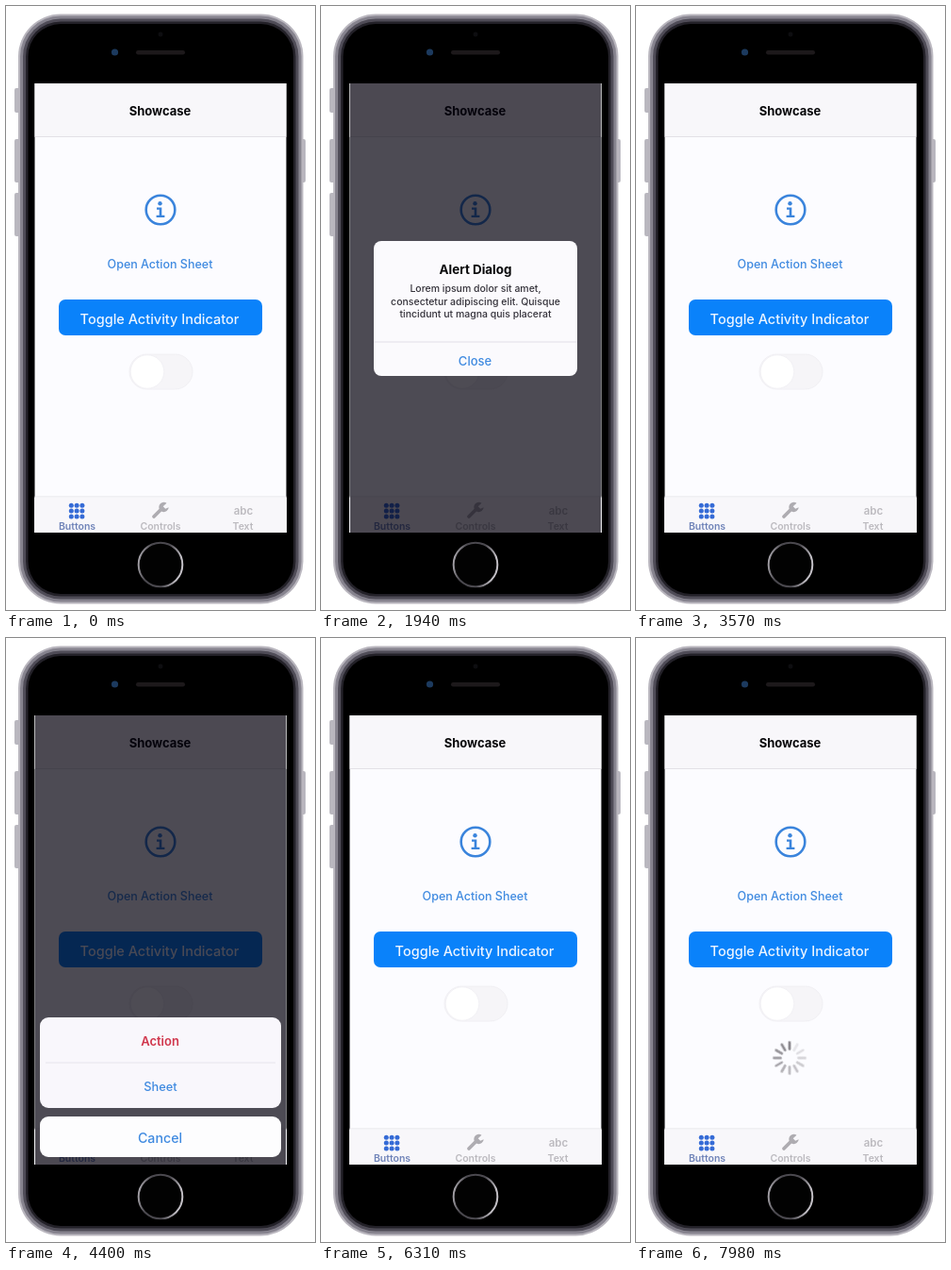
These frames come from a looping animation (328 px wide and 640 px high, 8 s). An HTML page:

```html
<!DOCTYPE html>
<html lang="en">
<head>
<meta charset="utf-8">
<title>Showcase</title>
<style>
  html, body { margin: 0; width: 100%; height: 100%; overflow: hidden; background: #fff; }
  svg { display: block; width: 100%; height: 100%; }
  text { font: 500 12.5px Inter, Roboto, sans-serif; text-anchor: middle; }
  .title { font-size: 13px; font-weight: 700; fill: #08080a; }
  .body { font-size: 10.5px; fill: #34323a; }
  .tab { font-size: 10.5px; font-weight: 600; }
  .bar { fill: #f8f7fa; }
  .idle { fill: #bcbabf; }
  .link { fill: #3f8ae0; }
  .tint { fill: #e5e3ea; }
  #alert, #sheet, #dim, #spinner, #closeTint, #cancelTint { opacity: 0; }
  #alert { transform-origin: 164px 320px; }
  #wheel { transform-origin: 163px 445px; }
</style>
</head>
<body>
<svg viewBox="0 0 328 640">
  <defs>
    <clipPath id="screen"><rect x="30.5" y="82" width="267" height="476"/></clipPath>
    <clipPath id="dialog"><rect x="56" y="249" width="216" height="143" rx="8"/></clipPath>
    <linearGradient id="ring" x2="1" y2="0.2">
      <stop offset="0" stop-color="#c3c0c6"/>
      <stop offset="0.3" stop-color="#4a484e"/>
      <stop offset="0.7" stop-color="#4a484e"/>
      <stop offset="1" stop-color="#c3c0c6"/>
    </linearGradient>
  </defs>

  <!-- Handset -->
  <g fill="#b9b7bf">
    <rect x="9" y="87" width="6" height="26" rx="2"/>
    <rect x="9" y="141" width="6" height="46" rx="2"/>
    <rect x="9" y="198" width="6" height="46" rx="2"/>
    <rect x="313" y="141" width="5" height="46" rx="2"/>
  </g>
  <g id="shell"></g>
  <circle cx="115.5" cy="49" r="3.6" fill="#1c3a5e"/>
  <circle cx="164" cy="30" r="2.5" fill="#0d0d10"/>
  <rect x="138" y="47" width="52" height="4.5" rx="2.2" fill="#1d191b"/>
  <circle cx="164" cy="592" r="23.3" fill="#020202" stroke="url(#ring)" stroke-width="2"/>

  <g clip-path="url(#screen)">
    <rect x="30" y="82" width="268" height="476" fill="#fcfcff"/>
    <rect class="bar" x="30" y="82" width="268" height="56"/>
    <path d="M30 138.5H298M30 520H298" stroke="#e3e1e6"/>
    <text class="title" x="163.5" y="116">Showcase</text>

    <g id="info" color="#3a84dc" fill="currentColor">
      <circle cx="164" cy="216" r="15.3" fill="none" stroke="currentColor" stroke-width="2.6"/>
      <circle cx="163.5" cy="209.3" r="2.2"/>
      <path d="M160 213.5H165.3V221.7H168.4V224H159.6V221.7H162.7V215.8H160Z"/>
    </g>

    <text id="openLink" class="link" x="163.5" y="278">Open Action Sheet</text>

    <rect id="button" x="56" y="311" width="216" height="38" rx="7" fill="#0a82fa"/>
    <text x="163" y="336.5" style="font-size:14.5px" fill="#edf5ff">Toggle Activity Indicator</text>

    <rect x="131" y="369" width="67" height="37" rx="18.5" fill="#f6f5f8" stroke="#f1f0f4"/>
    <circle cx="150" cy="387.5" r="17.8" fill="#fff" stroke="#f2f1f5"/>

    <g id="spinner"><g id="wheel" stroke="#87848a" stroke-width="2.7" stroke-linecap="round"></g></g>

    <rect class="bar" x="30" y="520.5" width="268" height="38"/>
    <g id="grid" fill="#356bd6"></g>
    <text class="tab" x="75.5" y="555" fill="#6f83b8">Buttons</text>
    <g fill="#aeacb1">
      <path d="M157 541L165.5 532.5" stroke="#aeacb1" stroke-width="3.8" stroke-linecap="round"/>
      <path d="M170.5 526.7A5.2 5.2 0 1 0 172.7 531.2L169.2 532.8L166.7 530.3Z"/>
    </g>
    <text class="tab idle" x="164" y="555">Controls</text>
    <text class="idle" x="252" y="539" style="font-size:11.5px;font-weight:600">abc</text>
    <text class="tab idle" x="251.5" y="555">Text</text>

    <rect id="dim" x="30" y="82" width="268" height="476" fill="#04000c"/>

    <g id="alert">
      <g clip-path="url(#dialog)">
        <rect x="56" y="249" width="216" height="143" fill="#fbfafd"/>
        <rect x="56" y="355.5" width="216" height="1" fill="#e2e0e7"/>
        <rect id="closeTint" class="tint" x="56" y="356" width="216" height="36"/>
      </g>
      <text class="title" x="164" y="283.5" style="font-size:13.4px">Alert Dialog</text>
      <text class="body" x="164" y="303">Lorem ipsum dolor sit amet,</text>
      <text class="body" x="164" y="316.5">consectetur adipiscing elit. Quisque</text>
      <text class="body" x="164" y="330">tincidunt ut magna quis placerat</text>
      <text class="link" x="163.5" y="381" style="font-size:13px">Close</text>
    </g>

    <g id="sheet">
      <rect x="36" y="402" width="256" height="96" rx="9" fill="#f9f7fc"/>
      <path d="M42 450H286" stroke="#e6e4ec"/>
      <text x="163.5" y="431.5" style="font-weight:600;font-size:13px" fill="#d0364c">Action</text>
      <text class="link" x="164" y="480" style="font-size:12.8px">Sheet</text>
      <rect x="36" y="507" width="256" height="43" rx="9" fill="#fdfdfe"/>
      <rect id="cancelTint" class="tint" x="36" y="507" width="256" height="43" rx="9"/>
      <text class="link" x="163.5" y="535" style="font-size:14.2px">Cancel</text>
    </g>
  </g>
</svg>

<script>
const LOOP = 8000;
const get = id => document.getElementById(id);

function add(parent, tag, attrs) {
  const node = document.createElementNS("http://www.w3.org/2000/svg", tag);
  for (const [name, value] of Object.entries(attrs)) node.setAttribute(name, value);
  get(parent).append(node);
}

[[0, "#b9b6be"], [2, "#86838e"], [5, "#4f4c57"], [8, "#232128"], [10.5, "#000"]].forEach(([inset, fill]) =>
  add("shell", "rect", {
    x: 13 + inset, y: 8.5 + inset, width: 302.5 - 2 * inset, height: 625 - 2 * inset,
    rx: 45 - inset, fill
  }));

for (let i = 0; i < 9; i++) {
  add("grid", "circle", { cx: 69.3 + i % 3 * 5.8, cy: 529.3 + Math.floor(i / 3) * 5.8, r: 2.5 });
}

for (let i = 0; i < 12; i++) {
  add("wheel", "path", {
    d: "M163 435.5V428.5",
    transform: `rotate(${30 - i * 30} 163 445)`,
    opacity: 1 - i * 0.075
  });
}

// Each step is [time in ms, value, easing towards the next step].
function play(id, property, steps) {
  const at = (time, value, easing = "linear") => ({ offset: time / LOOP, [property]: value, easing });
  const frames = steps.map(step => at(...step));
  if (steps[0][0] > 0) frames.unshift(at(0, steps[0][1]));
  frames.push(at(LOOP, steps.at(-1)[1]));
  get(id).animate(frames, { duration: LOOP, iterations: Infinity });
}

const pulse = (id, property, rest, pressed, from, to) =>
  play(id, property, [[0, rest, "step-end"], [from, pressed, "step-end"], [to, rest, "step-end"]]);

pulse("info", "color", "#3a84dc", "#1c3078", 1260, 1400);
pulse("closeTint", "opacity", 0, 1, 2730, 2960);
pulse("openLink", "fill", "#3f8ae0", "#1c3078", 3720, 3880);
pulse("cancelTint", "opacity", 0, 1, 5490, 5700);
pulse("button", "fill", "#0a82fa", "#0a30b2", 7050, 7220);
pulse("spinner", "opacity", 0, 1, 7240, LOOP);

play("dim", "opacity", [
  [1420, 0, "ease-out"], [1640, 0.7], [2880, 0.7, "ease-in"], [3080, 0],
  [3900, 0, "ease-out"], [4220, 0.7], [5680, 0.7, "ease-in"], [5960, 0]
]);
play("alert", "opacity", [[1420, 0, "ease-out"], [1640, 1], [2880, 1, "ease-in"], [3080, 0]]);
play("alert", "transform", [
  [1420, "scale(1.15)", "ease-out"], [1660, "scale(1)"], [3080, "scale(1)", "step-end"], [3100, "scale(1.15)"]
]);
play("sheet", "transform", [
  [3900, "translateY(160px)", "cubic-bezier(.2,.8,.2,1)"], [4300, "translateY(0px)"],
  [5680, "translateY(0px)", "ease-in"], [5980, "translateY(160px)"]
]);
pulse("sheet", "opacity", 0, 1, 3900, 5990);

get("wheel").animate(
  [{ transform: "rotate(0deg)" }, { transform: "rotate(360deg)" }],
  { duration: 1000, iterations: Infinity, easing: "steps(12)" }
);
</script>
</body>
</html>
```
